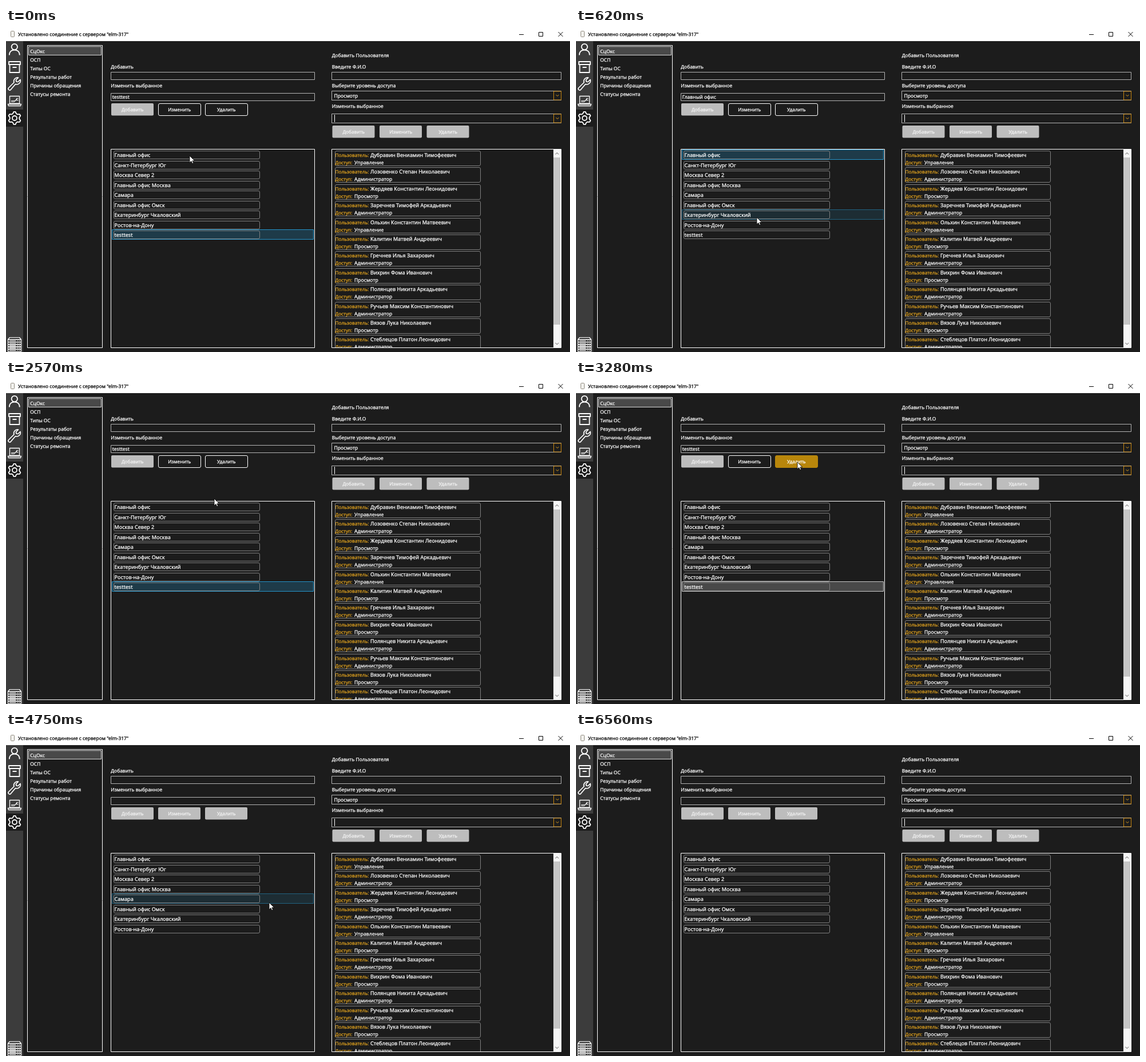
An HTML page with a canvas for the animation above (7050 ms loop, 986 by 568 pixels).

```html
<!DOCTYPE html>
<html lang="ru">
<head>
<meta charset="utf-8">
<style>
html, body { margin: 0; width: 100%; height: 100%; overflow: hidden; background: #1c1c1c; }
canvas { display: block; }
</style>
</head>
<body>
<canvas id="stage" width="986" height="568"></canvas>
<script>
const ctx = document.getElementById('stage').getContext('2d');
const LOOP = 7050, BG = '#1c1c1c', GOLD = '#dea01e', FIELD = '#b4b4b4';
const SMALL = 8.4, LARGE = 9.05;
const CLICK_FIRST = 90, CLICK_TEST = 1630, CLICK_DELETE = 3280;
const DIALOG_OPEN = 3310, DIALOG_CLOSE = 4610, REMOVED = 4660;
const ROW_TOP = 213.6, ROW_STEP = 17.5, USER_TOP = 215.4, USER_STEP = 29.4;

const menu = ['СцОкс', 'ОСП', 'Типы ОС', 'Результаты работ', 'Причины обращения', 'Статусы ремонта'];
const offices = ['Главный офис', 'Санкт-Петербург Юг', 'Москва Север 2', 'Главный офис Москва', 'Самара',
  'Главный офис Омск', 'Екатеринбург Чкаловский', 'Ростов-на-Дону', 'testtest'];
const levels = { У: 'Управление', А: 'Администратор', П: 'Просмотр' };
const users = [
  ['Дубравин Вениамин Тимофеевич', 'У'], ['Лозовенко Степан Николаевич', 'А'],
  ['Жердяев Константин Леонидович', 'П'], ['Заречнев Тимофей Аркадьевич', 'А'],
  ['Ольхин Константин Матвеевич', 'У'], ['Калитин Матвей Андреевич', 'П'],
  ['Гречнев Илья Захарович', 'А'], ['Вихрин Фома Иванович', 'П'],
  ['Полянцев Никита Аркадьевич', 'А'], ['Ручьев Максим Константинович', 'А'],
  ['Вязов Лука Николаевич', 'П'], ['Стеблецов Платон Леонидович', 'А']
];

// Pointer stops: time, x, y
const stops = [
  [0, 321, 224], [60, 321, 224], [780, 315, 347], [1130, 306, 364], [2100, 306, 364], [2130, 307, 364],
  [2250, 307, 364], [2750, 387, 144], [3810, 387, 144], [4100, 458, 299], [4250, 458, 299],
  [4300, 460, 299], [6120, 460, 299], [6560, 955, 570]
];

const clamp = v => Math.max(0, Math.min(1, v));
const fade = (t, start) => clamp((t - start) / 200);

function pointerAt(t) {
  const i = stops.findIndex(s => s[0] > t);
  if (i < 0) return null;
  const [t0, x0, y0] = stops[i - 1], [t1, x1, y1] = stops[i];
  const p = (t - t0) / (t1 - t0), e = p * p * (3 - 2 * p);
  return { x: x0 + (x1 - x0) * e, y: y0 + (y1 - y0) * e };
}

// Transparent white to dark gold, mixed in linear light
function glow(p) {
  const mix = c => Math.round(255 * (1 - p + p * (c / 255) ** 2.2) ** (1 / 2.2));
  return `rgba(${mix(184)},${mix(134)},${mix(11)},${p})`;
}

// The hairline stroke gives the text its slightly heavier weight
function text(str, x, y, size = SMALL, color = '#fff', align = 'left') {
  ctx.font = `${size}px "Noto Sans", "Open Sans", sans-serif`;
  ctx.textAlign = align;
  ctx.fillStyle = ctx.strokeStyle = color;
  ctx.lineWidth = .25;
  ctx.fillText(str, x, y + 3.3);
  ctx.strokeText(str, x, y + 3.3);
}

function fill(x, y, w, h, color) {
  ctx.fillStyle = color;
  ctx.fillRect(x, y, w, h);
}

function box(x, y, w, h, stroke, back, r = 0) {
  ctx.beginPath();
  ctx.roundRect(x, y, w, h, r);
  if (back) { ctx.fillStyle = back; ctx.fill(); }
  if (stroke) { ctx.strokeStyle = stroke; ctx.lineWidth = 1; ctx.stroke(); }
}

function line(d, color = '#fff', width = 1) {
  ctx.strokeStyle = color;
  ctx.lineWidth = width;
  ctx.stroke(new Path2D(d));
}

function button(label, x, y, enabled, hover = 0) {
  if (enabled) box(x + .5, y + .5, 74, 21, hover === 1 ? '#b8860b' : '#fff', glow(hover), 2.5);
  else box(x, y, 74, 21.5, null, '#bdbdbd', 2);
  text(label, x + 37.3, y + 11, 8.2, enabled ? '#fff' : '#f4f4f4', 'center');
}

function titleBar(active) {
  const ink = active ? '#000' : '#999';
  fill(0, 0, 986, 23, '#fff');
  box(8.5, 5.5, 6, 10, active ? '#8c877c' : '#c0bdb6', '#f4f3ef', 1);
  text('Установлено соединение с сервером "elm-317"', 21, 11, SMALL, ink);
  line('M897 11.5h8M931.5 7.5h7v7h-7zM965.5 7l8 8m0-8l-8 8', ink);
}

function gear(cx, cy) {
  let d = '';
  for (let i = 0; i < 24; i++) {
    const a = (i - .5) * Math.PI / 12 - Math.PI / 2;
    const r = i % 4 < 2 ? 11.2 : 8.3;
    d += `${i ? 'L' : 'M'}${cx + r * Math.cos(a)} ${cy + r * Math.sin(a)}`;
  }
  return `${d}zM${cx + 4} ${cy}a4 4 0 1 0-8 0a4 4 0 1 0 8 0`;
}

function iconBar() {
  fill(0, 23, 30, 545, '#3c3c3c');
  fill(0, 143, 30, 30, BG);
  ctx.lineJoin = 'round';
  line('M20 33a5.2 5.2 0 1 0-10.4 0a5.2 5.2 0 1 0 10.4 0M5.8 47.5c0-6 4-9 9-9s9 3 9 9', '#fff', 1.8);
  line('M5 59h20v5h-20zM6.5 64v14h17v-14M11.5 69h7', '#fff', 1.8);
  line('M21.5 87l-4 4 .5 3 3 .5 4-4a6.5 6.5 0 0 1-8.5 8L8 108.5a2.5 2.5 0 0 1-3.5-3.5L14 95.5A6.5 6.5 0 0 1 21.5 87z', '#fff', 1.7);
  line('M6.5 119.5h17v13h-17zM3.5 133.5h23l-1 3h-21z', '#fff', 1.3);
  line('M9 127.5h6M9 129.5h6M15 128.5l3-3M21.5 123.5h-3v3h3', '#fff', 1.2);
  line(gear(15, 158), '#fff', 1.8);
  line('M6.5 542.5h17l3 3.5h-23z', '#fff', 1.2);
  for (let y = 546.5; y < 566; y += 4.2) line(`M3.5 ${y}h23v4h-23zM6 ${y + 2}h11M20 ${y + 2}h1M23 ${y + 2}h1`, '#fff', 1.1);
  ctx.lineJoin = 'miter';
}

function menuPanel() {
  box(37.5, 30.5, 131, 530, '#fff');
  box(39.5, 32.5, 127, 15, '#dadada', 'rgba(218,218,218,.24)');
  menu.forEach((m, i) => text(m, 42.3, 40.3 + i * 15));
}

function combo(y) {
  box(569.5, y, 401, 16, FIELD);
  box(957.5, y + .5, 13, 15, '#c8860f', BG);
  line(`M961.5 ${y + 6.5}l2.5 2.5 2.5-2.5`, GOLD);
}

function officeForm(t) {
  const removed = t >= REMOVED;
  const picked = removed ? '' : t >= CLICK_FIRST && t < CLICK_TEST ? offices[0] : offices[8];
  text('Добавить', 183.3, 68);
  box(183.5, 77.5, 356, 13, FIELD);
  text('Изменить выбранное', 183.3, 101);
  box(183.5, 114.5, 356, 13, FIELD);
  text(picked, 185.7, 121, 8.5);
  button('Добавить', 184, 132, false);
  button('Изменить', 266, 132, !removed);
  button('Удалить', 348, 132, !removed, fade(t, 2710) * (1 - fade(t, DIALOG_OPEN)));
}

function officeList(t, pointer) {
  const count = t < REMOVED ? 9 : 8;
  const selected = t >= REMOVED ? -1 : t >= CLICK_FIRST && t < CLICK_TEST ? 0 : 8;
  const free = t >= 60 && (t < DIALOG_OPEN || t >= DIALOG_CLOSE);
  const hovered = free && pointer && pointer.x > 185 && pointer.x < 538
    ? Math.floor((pointer.y - ROW_TOP) / ROW_STEP) : -1;
  box(183.5, 212.5, 356, 348, '#fff');
  for (let i = 0; i < count; i++) {
    const y = Math.floor(ROW_TOP + ROW_STEP * i);
    if (i === selected) {
      const rgb = t >= CLICK_DELETE ? '218,218,218' : '38,160,218';
      box(185.5, y + .5, 352, 17, `rgba(${rgb},.9)`, `rgba(${rgb},.24)`);
    } else if (i === hovered) {
      box(185.5, y + .5, 352, 17, 'rgba(38,160,218,.5)', 'rgba(38,160,218,.12)');
    }
    box(188.5, y + 2.5, 255, 14, '#808080', null, 2.5);
    text(offices[i], 189.5, y + 9.7, LARGE);
  }
}

function userForm() {
  text('Добавить Пользователя', 569.7, 48);
  text('Введите Ф.И.О', 569.7, 68);
  box(569.5, 77.5, 401, 13, FIELD);
  text('Выберите уровень доступа', 569.7, 101);
  combo(110.5);
  text('Просмотр', 573.5, 119, 8.6);
  text('Изменить выбранное', 569.7, 137);
  combo(150.5);
  line('M574.5 152v13');
  ['Добавить', 'Изменить', 'Удалить'].forEach((s, i) => button(s, 570.5 + i * 82.5, 171, false));
}

function userList() {
  ctx.save();
  ctx.beginPath();
  ctx.rect(570, 213, 387, 347);
  ctx.clip();
  users.forEach(([name, level], i) => {
    const y = Math.floor(USER_TOP + USER_STEP * i);
    box(575.5, y + .5, 254, 26, '#808080', null, 2.5);
    text('Пользователь:', 575.5, y + 7.5, 8.2, GOLD);
    text(name, 637, y + 8, LARGE);
    text('Доступ:', 575.5, y + 20.5, 8.2, GOLD);
    text(levels[level], 609, y + 20.5, 8.6);
  });
  ctx.restore();
  fill(957, 213, 13, 347, '#f6f6f6');
  fill(957, 227, 12, 293, '#c6c6c6');
  line('M960.5 221.5l2.8-2.8 2.8 2.8M960.5 552l2.8 2.8 2.8-2.8', '#8a8a8a', 1.1);
  box(569.5, 212.5, 401, 348, '#fff');
}

function dialog(t) {
  box(380.5, 254.5, 224, 66, '#fff', BG);
  text('Удалить "testtest"?', 492.5, 269, SMALL, '#fff', 'center');
  button('Да', 417, 290, true, fade(t, 4050));
  button('Нет', 492, 290, true);
}

function drawPointer({ x, y }) {
  const arrow = new Path2D('M0 0V12.2L2.9 9.5L4.7 13.6L6.7 12.8L4.9 8.8H8.8Z');
  ctx.save();
  ctx.translate(Math.round(x), Math.round(y));
  ctx.fillStyle = '#fff';
  ctx.strokeStyle = '#000';
  ctx.lineWidth = .8;
  ctx.fill(arrow);
  ctx.stroke(arrow);
  ctx.restore();
}

function draw(t) {
  const open = t >= DIALOG_OPEN && t < DIALOG_CLOSE;
  const pointer = pointerAt(t);
  ctx.textRendering = 'geometricPrecision';
  fill(0, 0, 986, 568, BG);
  titleBar(!open);
  iconBar();
  menuPanel();
  officeForm(t);
  officeList(t, pointer);
  userForm();
  userList();
  if (open) dialog(t);
  if (pointer) drawPointer(pointer);
}

function tick() {
  draw(performance.now() % LOOP);
  requestAnimationFrame(tick);
}
tick();
</script>
</body>
</html>
```
